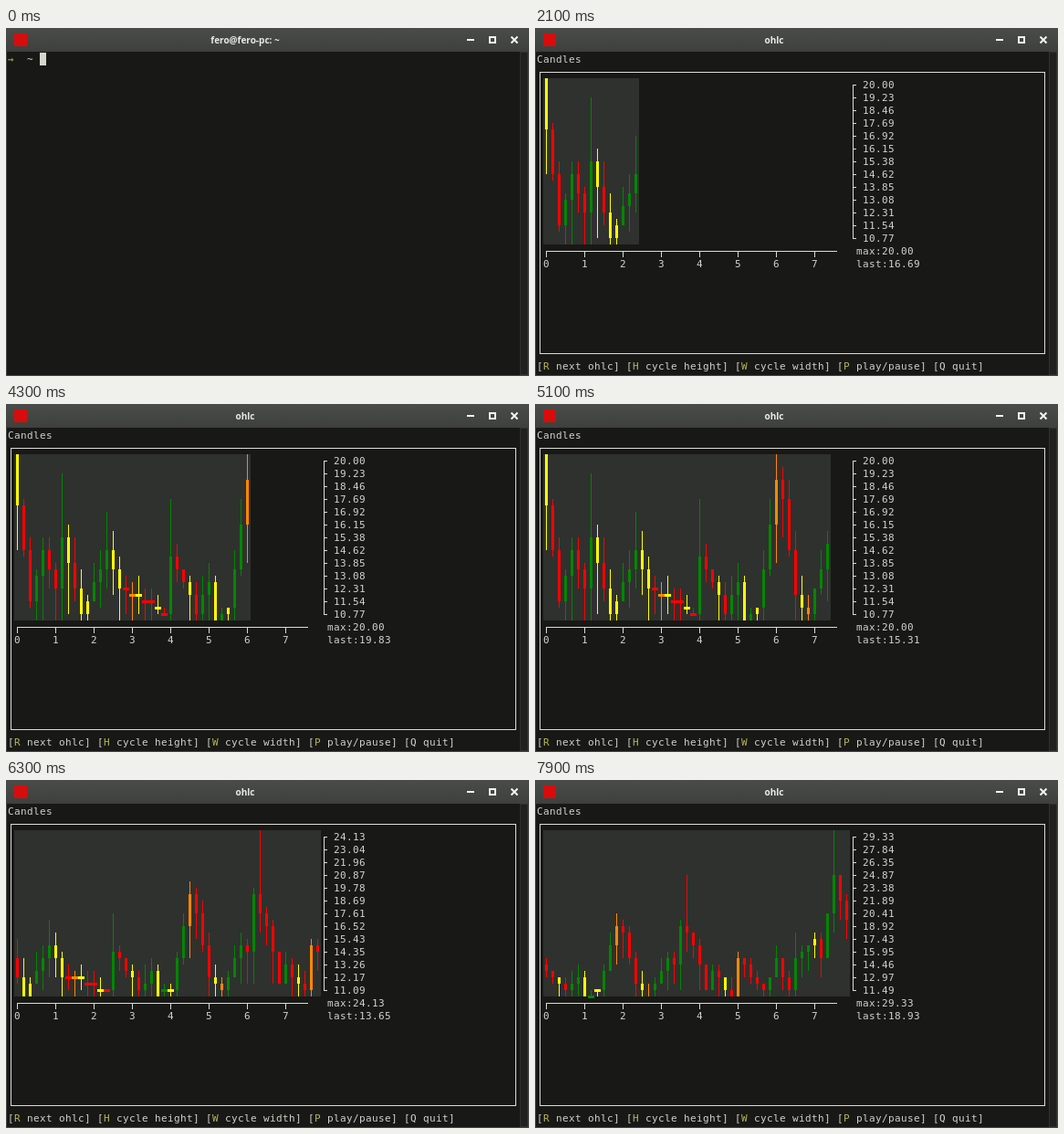
An HTML page that plays this animation: 573 px wide and 381 px high, repeating every 8000 ms.

```html
<!DOCTYPE html>
<html lang="en">
<head>
<meta charset="utf-8">
<title>ohlc</title>
<style>
  html, body { margin: 0; width: 100%; height: 100%; overflow: hidden; background: #181816; }
  svg { display: block; width: 573px; height: 381px; shape-rendering: crispEdges; }
  text { white-space: pre; fill: #d3d3cb; font: 11px "DejaVu Sans Mono", monospace; }
  #title { fill: #e9e9e6; font: bold 10px "Open Sans", "Noto Sans", sans-serif; text-anchor: middle; }
  .key { fill: #b4b45a; }
  .arrow { fill: #98984e; font-weight: bold; }
  .line { fill: none; stroke: #dcdcd4; }
  .btn { fill: none; stroke: #f2f2f0; stroke-width: 2; }
</style>
</head>
<body>
<svg viewBox="0 0 573 381">
  <defs>
    <linearGradient id="bar" x2="0" y2="1">
      <stop stop-color="#4a4c49"/><stop offset="1" stop-color="#3e403d"/>
    </linearGradient>
  </defs>
  <rect width="573" height="381" fill="#181816"/>
  <rect x="563.5" y="26.5" width="8" height="353" fill="#212120" stroke="#30302e"/>
  <rect x=".5" y=".5" width="572" height="380" fill="none" stroke="#444643"/>
  <rect width="573" height="26" fill="url(#bar)"/>
  <rect x="9" y="6" width="14" height="14" fill="#d80c0c"/>
  <text id="title" x="262" y="17"></text>
  <path class="btn" d="M505 13H513M530 10H536V16H530Z"/>
  <path class="btn" d="M553.5 9.5L560.5 16.5M560.5 9.5L553.5 16.5" shape-rendering="auto"/>

  <g id="shell"></g>
  <g id="app">
    <rect class="line" x="5.5" y="48.5" width="553" height="308"/>
    <g id="menu"></g>
    <g id="chart">
      <rect id="plot" x="9" y="55" height="182" fill="#2f312e"/>
      <g id="candles"></g>
      <path id="axes" class="line"/>
      <g id="labels"></g>
    </g>
  </g>
</svg>
<script>
const LOOP = 8000, STEP = 100;
const CELL_W = 7, CELL_H = 14, COLS = 48, ROWS = 13;
const COMMAND = 'ohlc', FLOOR = 10;

// Turning points of the price: [candle, close].
const turns = [
  [-1, 20], [2, 11.2], [4, 14.2], [6, 11.9], [7, 15], [10, 10.2], [14, 14.2], [16, 11.9],
  [23, 10.3], [24, 13.8], [27, 11.65], [28, 10.4], [30, 12.3], [31, 10], [33, 10.6], [36, 18.5],
  [37, 17.3], [39, 11.5], [41, 10.4], [44, 14.6], [45, 13.8], [46, 18.5], [48, 16], [50, 11.1],
  [51, 12.7], [54, 10.3], [55, 14.4], [56, 13.65], [59, 10.5], [61, 14.4], [63, 10.6], [64, 14.4],
  [67, 16.7], [68, 14.5], [70, 24.1], [72, 18.93]];
const spikes = { 0: 20, 7: 18.8, 14: 16.69, 24: 17.3, 44: 15.31, 47: 24.129, 64: 17.38, 70: 29.327 };
const yellow = [0, 8, 10, 11, 15, 16, 19, 22, 27, 31, 33, 40, 53, 67];
const orange = [18, 36, 41, 55];

const $ = id => document.getElementById(id);
const range = n => [...Array(n).keys()];
const rect = (x, y, w, h, fill) =>
  `<rect x="${x}" y="${y}" width="${w}" height="${h}" fill="${fill}"/>`;

// Terminal text: one character per cell.
function print(col, row, str, cls = '') {
  const s = String(str);
  const xs = range(s.length).map(k => 2 + CELL_W * (col + k)).join(' ');
  return `<text class="${cls}" x="${xs}" y="${38 + CELL_H * row}">${s}</text>`;
}

function random(seed) {
  const v = Math.sin(seed * 12.9898) * 43758.5453;
  return v - Math.floor(v);
}

function price(i) {
  const k = Math.max(1, turns.findIndex(t => t[0] >= i));
  const [i0, p0] = turns[k - 1], [i1, p1] = turns[k];
  return p0 + (p1 - p0) * (i - i0) / (i1 - i0);
}

function makeCandle(i) {
  const open = price(i - 1), close = price(i);
  const top = Math.max(open, close), bottom = Math.min(open, close);
  const rising = close > open;
  const high = spikes[i] ?? top + 1.45 * random(i + 1);
  const low = Math.max(FLOOR, bottom - 3 * random(i + 101));
  const fill = yellow.includes(i) ? '#ff0' : orange.includes(i) ? '#ff8700'
    : rising ? '#008700' : '#f00';
  return { top, bottom, high, low, fill, last: rising ? high : close };
}

const candles = range(turns.at(-1)[0] + 1).map(makeCandle);

function drawCandle(c, x, max, min) {
  const halfRows = 2 * ROWS / (max - min);
  const y = v => 55 + CELL_H / 2 * Math.round((max - v) * halfRows);
  const wick = rect(x + 3, y(c.high), 1, y(c.low) - y(c.high), c.fill);
  const flat = (c.top - c.bottom) * halfRows < .6;
  return wick + (flat
    ? rect(x, y(c.top) - 1, CELL_W, 3, c.fill)
    : rect(x + 2, y(c.top), 3, y(c.bottom) - y(c.top), c.fill));
}

function drawChart(n) {
  const shown = candles.slice(Math.max(0, n - COLS), n);
  const max = Math.max(...shown.map(c => c.high));
  const min = Math.min(...shown.map(c => c.low));

  $('plot').setAttribute('width', shown.length * CELL_W);
  $('candles').innerHTML =
    shown.map((c, k) => drawCandle(c, 9 + CELL_W * k, max, min)).join('');
  $('labels').innerHTML =
    range(ROWS).map(k => print(51, 2 + k, (max - k * (max - min) / ROWS).toFixed(2))).join('') +
    range(8).map(k => print(1 + 6 * k, 16, k)).join('') +
    print(50, 15, 'max:' + max.toFixed(2)) +
    print(50, 16, 'last:' + shown.at(-1).last.toFixed(2));
}

function drawShell(step) {
  const typed = COMMAND.slice(0, step);
  const entered = step > COMMAND.length;
  const col = entered ? 0 : 5 + typed.length;
  $('shell').innerHTML = print(0, 0, '→', 'arrow') + print(3, 0, '~ ' + typed) +
    rect(2 + CELL_W * col, entered ? 41 : 27, CELL_W, CELL_H, '#d6d6ce');
}

function draw(step) {
  const n = step - 6;
  const running = n >= 0;
  $('title').textContent = step > COMMAND.length ? COMMAND : 'fero@fero-pc: ~';
  $('shell').style.display = running ? 'none' : '';
  $('app').style.display = running ? '' : 'none';
  $('chart').style.display = n > 0 ? '' : 'none';
  if (!running) drawShell(step);
  else if (n > 0) drawChart(n);
}

function drawMenu() {
  let col = 0;
  const items = ['R next ohlc', 'H cycle height', 'W cycle width', 'P play/pause', 'Q quit'];
  $('menu').innerHTML = print(0, 0, 'Candles') + items.map(item => {
    const at = col;
    col += item.length + 3;
    return print(at, 24, '[') + print(at + 1, 24, item[0], item[0] === 'Q' ? '' : 'key') +
      print(at + 2, 24, item.slice(1) + ']');
  }).join('');
}

drawMenu();
$('axes').setAttribute('d', 'M12 244.5H331M348.5 62V231' +
  range(8).map(k => `M${12.5 + 42 * k} 244v7`).join('') +
  range(ROWS).map(k => `M348 ${62.5 + CELL_H * k}h4`).join(''));

let current = -1;
function tick() {
  const step = Math.floor(performance.now() % LOOP / STEP);
  if (step !== current) draw(current = step);
  requestAnimationFrame(tick);
}
tick();
</script>
</body>
</html>
```
